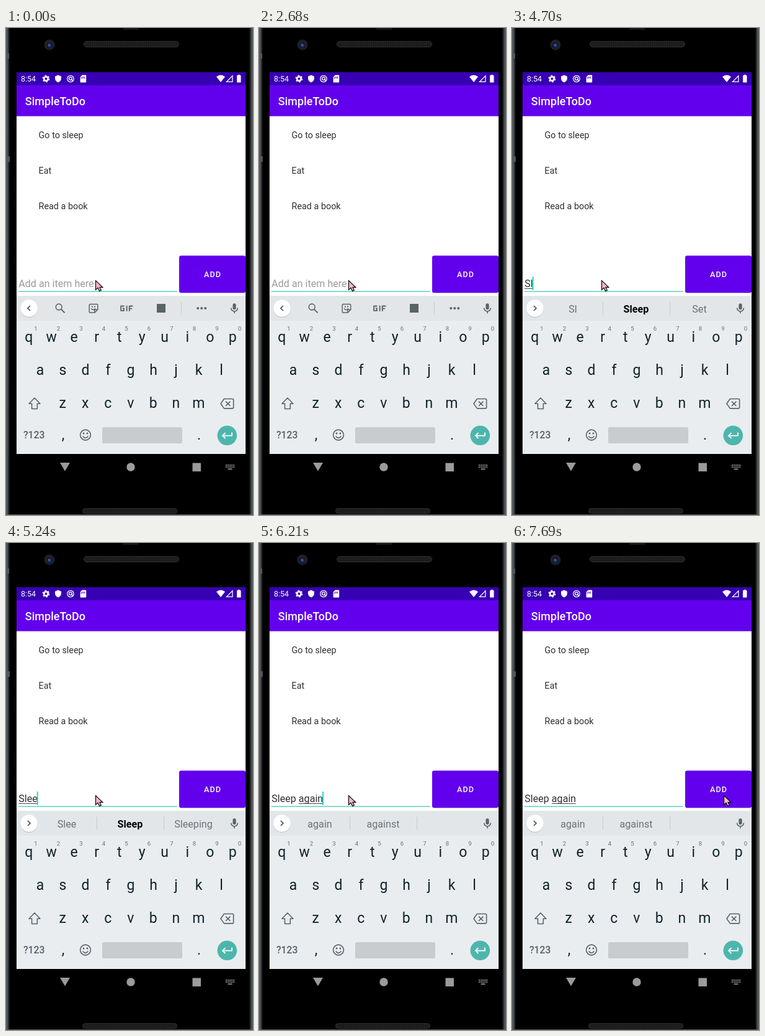
Write an HTML page that moves like this. It is 398 by 782 pixels and loops after 8 s.

```html
<!DOCTYPE html>
<html lang="en">
<head>
<meta charset="utf-8">
<title>To-do app</title>
<style>
  html, body { margin: 0; width: 100%; height: 100%; overflow: hidden; background: #000; }
  svg { display: block; width: 398px; height: 782px; font-family: Roboto, "Noto Sans", sans-serif; }
  text { white-space: pre; }
  .item { font-size: 14.37px; fill: #303030; }
  .field { font-size: 16.1px; }
  .key { font-size: 23px; fill: #10222a; text-anchor: middle; }
  .digit { font-size: 9.6px; fill: #66737a; text-anchor: middle; }
  .word { font-size: 16.16px; fill: #6c7276; text-anchor: middle; }
  .word.bold { font-weight: 700; fill: #000; }
  .icon { fill: none; stroke: #5a6468; stroke-width: 1.6; stroke-linejoin: round; }
  .solid { fill: #5a6468; }
</style>
</head>
<body>
<svg viewBox="0 0 398 782">
  <defs>
    <linearGradient id="edge">
      <stop offset="0" stop-color="#5c5f61"/>
      <stop offset=".45" stop-color="#4a4d4f"/>
      <stop offset=".75" stop-color="#222527"/>
      <stop offset="1" stop-color="#060606"/>
    </linearGradient>
    <pattern id="mesh" width="3" height="3" patternUnits="userSpaceOnUse">
      <rect width="3" height="3" fill="#242424"/>
      <circle cx="1.5" cy="1.5" r=".9" fill="#0b0b0b"/>
    </pattern>
    <radialGradient id="lens">
      <stop offset="0" stop-color="#3c58b0"/>
      <stop offset=".5" stop-color="#1b2b6b"/>
      <stop offset="1" stop-color="#0c1020"/>
    </radialGradient>
  </defs>

  <!-- phone body -->
  <rect width="398" height="782"/>
  <rect width="6" height="782" fill="url(#edge)"/>
  <rect width="6" height="782" fill="url(#edge)" transform="matrix(-1 0 0 1 398 0)"/>
  <path d="M0 41h5v8h-5zM0 206h6v9h-6z" fill="#55585a"/>
  <path d="M189 0h25v3h-25z" fill="#171717"/>
  <path d="M0 781.5H398" stroke="#5a5a5a"/>
  <rect x="125.5" y="21.5" width="153" height="9" rx="4.5" fill="url(#mesh)" stroke="#303030"/>
  <rect x="123.5" y="771.5" width="152" height="8" rx="4" fill="url(#mesh)" stroke="#303030"/>
  <circle cx="70" cy="27" r="8.5" fill="#202124"/>
  <circle cx="70" cy="28" r="4.8" fill="url(#lens)"/>
  <circle cx="69" cy="27" r=".8" fill="#8fa6d8"/>

  <!-- status and title bars -->
  <rect x="17" y="71" width="369" height="359" fill="#fff"/>
  <rect x="17" y="71" width="369" height="21" fill="#3700b3"/>
  <rect x="17" y="92" width="369" height="49.6" fill="#6200ee"/>
  <g fill="#fff">
    <text x="24" y="86.3" font-size="12.5">8:54</text>
    <text x="30.8" y="124" font-size="17.96" font-weight="500" letter-spacing=".06">SimpleToDo</text>
    <circle cx="64.5" cy="81.5" r="3.2" fill="none" stroke="#fff" stroke-width="2.6"/>
    <circle cx="64.5" cy="81.5" r="5.1" fill="none" stroke="#fff" stroke-width="1.6" stroke-dasharray="2.67"/>
    <path d="M84 75.5l5 2.2v3.4c0 3-2 5.3-5 6.4c-3-1.1-5-3.4-5-6.4v-3.4z"/>
    <g fill="none" stroke="#fff" stroke-width="1.3">
      <circle cx="104" cy="81.5" r="5.2"/><circle cx="104" cy="81.2" r="2.4"/><path d="M105 82l3 3.5"/>
    </g>
    <path d="M122.8 75.5h5.4q1 0 1 1v10q0 1-1 1h-7.6q-1 0-1-1v-7.8z"/>
    <path d="M121.5 79v2.2M123.9 78v3.2M126.3 78v3.2" stroke="#3700b3" stroke-width="1.1"/>
    <path d="M339 78.2q7-5.2 14 0l-7 8.8z"/>
    <path d="M355.5 86.4h9.4v-9.6z" fill="none" stroke="#fff" stroke-width="1.3"/>
    <path d="M373.8 76h-1q-.8 0-.8.8v10q0 .8.8.8h4.9q.8 0 .8-.8v-10q0-.8-.8-.8h-1v-1.1h-2.9z"/>
  </g>

  <!-- list, field, button -->
  <text class="item" x="52.6" y="177">Go to sleep</text>
  <text class="item" x="52.6" y="234">Eat</text>
  <text class="item" x="52.6" y="291">Read a book</text>
  <path d="M20 423.2H276" stroke="#42c4b8" stroke-width="1.3"/>
  <text id="field" class="field" x="20.3" y="416.3"></text>
  <rect id="under" y="418" height="1" fill="#444"/>
  <rect id="caret" y="399.3" width="1.8" height="21.4" fill="#03dac5"/>
  <rect x="279" y="366" width="107" height="60" rx="4" opacity=".08"/>
  <rect x="279" y="365.5" width="107" height="59.8" rx="3.2" fill="#6200ee"/>
  <text x="333" y="400.4" text-anchor="middle" font-size="12.57" font-weight="500" letter-spacing="1.12" fill="#fff">ADD</text>

  <!-- keyboard -->
  <rect x="17" y="430" width="369" height="254" fill="#e9edf0"/>
  <rect x="17" y="430" width="369" height="40" fill="#e2e6e9"/>
  <circle cx="37" cy="451" r="14" opacity=".13"/>
  <circle cx="37" cy="450" r="13.8" fill="#fff"/>
  <path id="chevron" fill="none" stroke="#4a4f52" stroke-width="1.7"/>
  <g id="tools">
    <g class="icon">
      <circle cx="85.2" cy="448" r="4.9"/><path d="M88.8 451.6l5.8 5.8" stroke-width="2"/>
      <path d="M136 443.5h10q1.8 0 1.8 1.8v7l-5 4.8h-6.8q-1.8 0-1.8-1.8v-10q0-1.8 1.8-1.8zM147.5 452.3h-4.7v4.7M137.3 450.6q3.3 4 6.6 0" stroke-width="1.5"/>
      <path d="M190.5 446.5h-5.3v7.4h4.7v-3.6h-2M194.6 445.7v9M198.8 454.7v-8.2h5.7M198.8 450.6h4.4" stroke-width="1.9"/>
    </g>
    <path class="solid" d="M138 446.6h2v2h-2zM142 446.6h2v2h-2z"/>
    <rect class="solid" x="243" y="443" width="14" height="14"/>
    <path d="M282.5 440V460.5" stroke="#c6cbce"/>
    <g class="solid"><circle cx="309.2" cy="450" r="2"/><circle cx="315.2" cy="450" r="2"/><circle cx="321.2" cy="450" r="2"/></g>
  </g>
  <g id="words">
    <path d="M146.5 439.5V461M254.5 439.5V461" stroke="#c6cbce"/>
    <text class="word" x="98" y="456.5"></text>
    <text class="word" x="200" y="456.5"></text>
    <text class="word" x="302" y="456.5"></text>
  </g>
  <rect class="solid" x="365.4" y="442.2" width="5.2" height="9.8" rx="2.6"/>
  <path class="icon" d="M362.6 449.6a5.4 5.4 0 0 0 10.8 0M368 455v3.2"/>
  <g id="keys"></g>
  <g class="icon">
    <path d="M46 594l9 9.3h-4.6v8.2h-8.8v-8.2h-4.6z"/>
    <path d="M351.4 595.5h13.4q1.8 0 1.8 1.8v11.8q0 1.8-1.8 1.8h-13.4l-5.4-7.7zM354 599.6l7.4 7.4M361.4 599.6l-7.4 7.4"/>
    <circle cx="128" cy="653.5" r="8.4"/><path d="M123.6 655.6q4.4 5.6 8.8 0"/>
  </g>
  <g class="solid"><circle cx="125" cy="651" r="1.4"/><circle cx="131" cy="651" r="1.4"/></g>
  <text x="45.2" y="659.2" text-anchor="middle" font-size="15.8" font-weight="500" fill="#566166">?123</text>
  <text class="key" x="92" y="661">,</text>
  <text class="key" x="311" y="661">.</text>
  <rect x="155" y="641" width="129" height="26" rx="2.5" fill="#c8cccf"/>
  <circle cx="356.3" cy="654.3" r="15.8" fill="#4db6ac"/>
  <path d="M364 649.6v5H349.4M353.4 650.2l-4.4 4.4l4.4 4.4" fill="none" stroke="#fff" stroke-width="1.8"/>

  <!-- navigation -->
  <g fill="#9b9b9b">
    <path d="M87 698h16l-8 13.5z"/>
    <circle cx="201" cy="705" r="6.7"/>
    <rect x="300.5" y="698.5" width="13.5" height="13.5"/>
    <path d="M354 702H368M354 705H368" stroke="#9b9b9b" stroke-width="1.8" stroke-dasharray="1.8 1.25"/>
    <rect x="357.5" y="707.4" width="7" height="1.6"/>
  </g>
  <path id="pointer" d="M.5.5V15.5L4 12.2L6.6 17.5L9.3 16.3L7 11.3H11.8Z" fill="#f8b6c8" stroke="#000" stroke-width="1.15"/>
</svg>
<script>
const $ = id => document.getElementById(id);
const LOOP = 8000, LEFT = 20.3, HINT = "Add an item here";

// time, typed text, start of the underlined word, suggestions, bold middle
const typing = [
  [0, "", 0, []],
  [4700, "Sl", 0, ["Sl", "Sleep", "Set"], true],
  [5090, "Sle", 0, ["Sle", "Sleep", "See"], true],
  [5240, "Slee", 0, ["Slee", "Sleep", "Sleeping"], true],
  [5390, "Sleep", 0, ["Sleep", "Sleeping", "Sleepy"]],
  [5515, "Sleep ", 6, ["and", "in", "well"]],
  [5640, "Sleep a", 6, ["a", "and", "at"]],
  [5790, "Sleep ag", 6, ["ag", "again", "at"], true],
  [5910, "Sleep aga", 6, ["aga", "again", "against"], true],
  [6060, "Sleep agai", 6, ["agai", "again", "against"], true],
  [6210, "Sleep again", 6, ["again", "against", ""]]
];
const moves = [
  [0, 144, 405], [6930, 79, 197], [7080, 74, 199], [7240, 365, 408],
  [7390, 344, 412], [7540, 341, 412], [7690, 341, 405]
];
const caretOn = [
  [150, 750], [1180, 1760], [2240, 2680], [3260, 3660],
  [4120, 4550], [4700, 6640], [7240, 7690]
];

const pen = document.createElement("canvas").getContext("2d");
pen.font = '16.1px Roboto, "Noto Sans", sans-serif';
const widthOf = s => pen.measureText(s).width;
const current = (list, t) => list.findLast(step => step[0] <= t);

function addText(cls, x, y, s) {
  const el = document.createElementNS("http://www.w3.org/2000/svg", "text");
  el.setAttribute("class", cls);
  el.setAttribute("x", x);
  el.setAttribute("y", y);
  el.textContent = s;
  $("keys").append(el);
}

function addRow(letters, x, y) {
  [...letters].forEach((c, i) => addText("key", x + i * 36.5, y, c));
}

addRow("qwertyuiop", 36.7, 504);
addRow("asdfghjkl", 55, 556.5);
addRow("zxcvbnm", 91.3, 609.5);
[..."1234567890"].forEach((c, i) => addText("digit", 48 + i * 36.5, 486.3, c));

const words = document.querySelectorAll("#words text");

function showTyping([, text, start, list, bold]) {
  const empty = !text, from = widthOf(text.slice(0, start)), end = widthOf(text);
  $("field").textContent = text || HINT;
  $("field").setAttribute("fill", empty ? "#9b9b9b" : "#303030");
  $("under").setAttribute("x", LEFT + from);
  $("under").setAttribute("width", Math.max(0, end - from));
  $("caret").setAttribute("x", LEFT + Math.max(0, end - 1));
  $("tools").style.display = empty ? "" : "none";
  $("words").style.display = empty ? "none" : "";
  $("chevron").setAttribute("d", empty ? "M39 446l-4 4l4 4" : "M35 446l4 4l-4 4");
  words.forEach((el, i) => { el.textContent = list[i] || ""; });
  words[1].classList.toggle("bold", !!bold);
}

let begin, shown;
function draw(now) {
  begin ??= now;
  const t = (now - begin) % LOOP;
  const step = current(typing, t);
  if (step !== shown) showTyping(shown = step);
  const [, x, y] = current(moves, t);
  $("pointer").setAttribute("transform", `translate(${x} ${y})`);
  $("caret").style.display = caretOn.some(([a, b]) => t >= a && t < b) ? "" : "none";
  requestAnimationFrame(draw);
}
requestAnimationFrame(draw);
</script>
</body>
</html>
```
